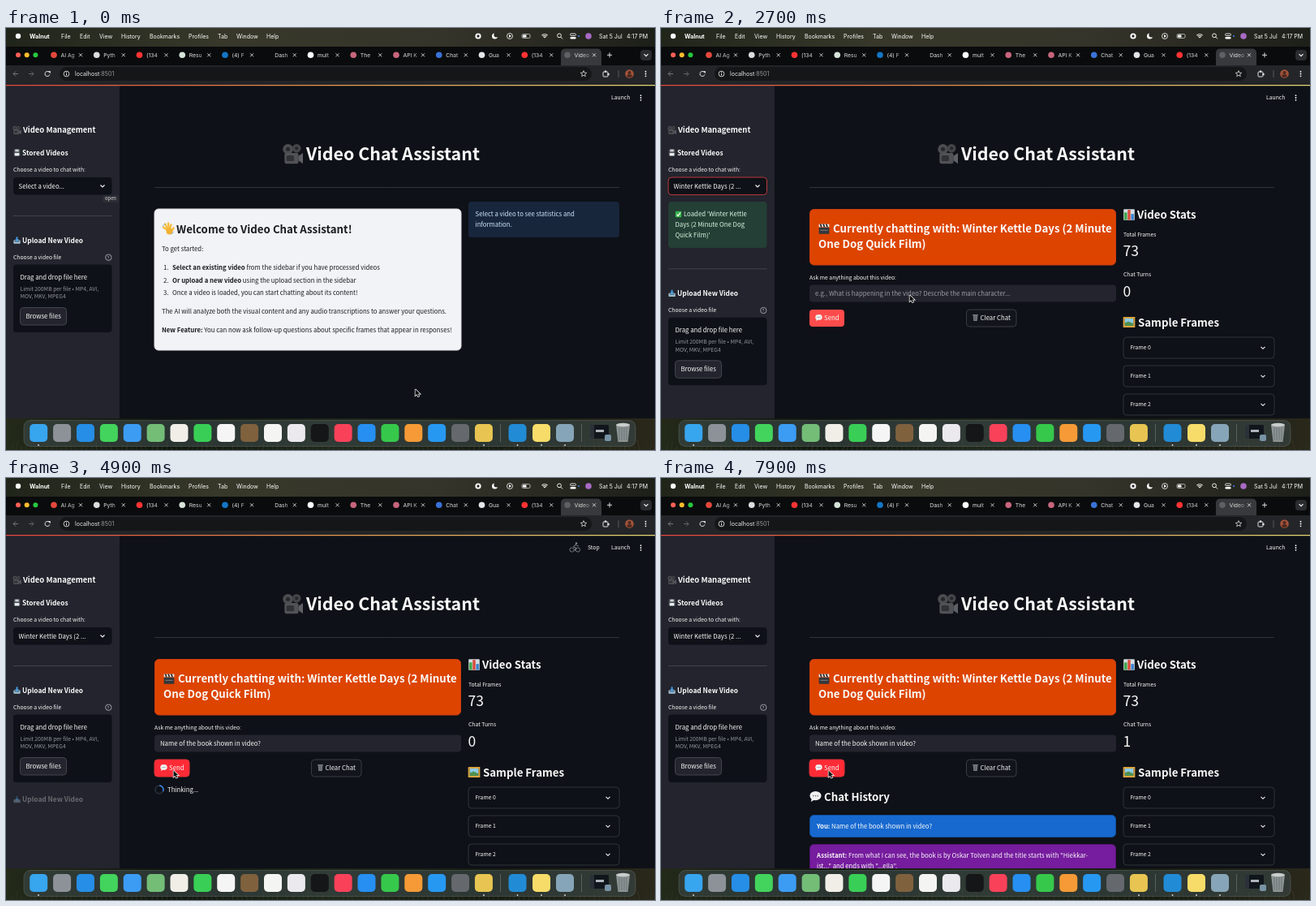
These frames come from a looping animation (800 px wide and 520 px high, 8 s). An HTML page with a canvas:

```html
<!DOCTYPE html>
<html lang="en">
<head>
<meta charset="utf-8">
<title>Video chat demo</title>
<style>
html, body { margin: 0; width: 800px; height: 520px; overflow: hidden; background: #0e1117 }
canvas { display: block }
</style>
</head>
<body>
<canvas id="stage" width="800" height="520"></canvas>
<script>
const ctx = document.getElementById('stage').getContext('2d');
const PAGE = '"Noto Sans CJK JP","Noto Sans CJK SC","Noto Sans CJK",sans-serif';
const UI = 'Inter,sans-serif';
const ZOOM = 0.4866; // page px to stage px for this typeface
const FILM = 'Winter Kettle Days (2 Minute One Dog Quick Film)';
const QUESTION = 'Name of the book shown in video?';
const BG = '#0e1117', PANEL = '#23242d', WHITE = '#fafafa', RED = '#ff4b4b', FOCUS = '#b8383c', LINE = '#31333b';

function box(x, y, w, h, r, fill, stroke) {
  ctx.beginPath();
  ctx.roundRect(x, y, w, h, r);
  if (fill) { ctx.fillStyle = fill; ctx.fill(); }
  if (stroke) { ctx.strokeStyle = stroke; ctx.lineWidth = 1; ctx.stroke(); }
}
function dot(x, y, r, fill) {
  ctx.beginPath();
  ctx.arc(x, y, r, 0, 7);
  ctx.fillStyle = fill;
  ctx.fill();
}
function arc(x, y, r, color, width = 1, from = 0, to = 2 * Math.PI) {
  ctx.beginPath();
  ctx.arc(x, y, r, from, to);
  ctx.strokeStyle = color;
  ctx.lineWidth = width;
  ctx.stroke();
}
function trace(points) {
  ctx.beginPath();
  for (let i = 0; i < points.length; i += 2) ctx.lineTo(points[i], points[i + 1]);
}
function line(points, color, width = 1) {
  trace(points);
  ctx.strokeStyle = color;
  ctx.lineWidth = width;
  ctx.stroke();
}
function poly(points, fill) {
  trace(points);
  ctx.fillStyle = fill;
  ctx.fill();
}
// y is the middle of the capitals; returns the right edge
function write(s, x, y, size, color, weight, family) {
  ctx.font = `${weight} ${size}px ${family}`;
  ctx.fillStyle = color;
  ctx.fillText(s, x, y + size * 0.365);
  return x + ctx.measureText(s).width;
}
const text = (s, x, y, px = 16, color = WHITE, weight = 400) => write(s, x, y, px * ZOOM, color, weight, PAGE);
const bold = (s, x, y, px = 16, color = WHITE) => text(s, x, y, px, color, 700);
const ui = (s, x, y, size = 7, color = '#fff', weight = 400) => write(s, x, y, size, color, weight, UI);
const chevron = (x, y, color = WHITE) => line([x - 2.5, y - 1.2, x, y + 1.3, x + 2.5, y - 1.2], color, 1.1);
function placed(x, y, scale, draw) {
  ctx.save();
  ctx.translate(x, y);
  ctx.scale(scale, scale);
  draw();
  ctx.restore();
}
function faded(alpha, draw) {
  ctx.save();
  ctx.globalAlpha = alpha;
  draw();
  ctx.restore();
}
function gradient(x0, y0, x1, y1, ...colors) {
  const g = ctx.createLinearGradient(x0, y0, x1, y1);
  colors.forEach((c, i) => g.addColorStop(i / (colors.length - 1), c));
  return g;
}

// Emoji, drawn on a grid of about 16 units around the centre
const emoji = {
  camera() {
    dot(-3.8, -4, 4, '#4b4d51'); dot(3, -4.6, 3.4, '#434549');
    dot(-3.8, -4, 1.6, '#25272a'); dot(3, -4.6, 1.3, '#25272a');
    box(-6.5, -1, 11, 8.5, 1.5, '#505256');
    box(-5, 1, 6, 4.5, 1, '#303236');
    poly([4.5, 1.5, 8, -1, 8, 7.5, 4.5, 5], '#5d6064');
  },
  hand() {
    ctx.lineCap = 'round';
    for (const [x, y] of [[-6, -2], [-4, -6], [0, -7], [3.5, -5]]) line([1, 3, x, y], '#f7bd3e', 2.4);
    line([3, 4, 6.5, -1], '#f7bd3e', 2.4);
    dot(1.5, 3, 4, '#f2b133');
    arc(0, 0, 7.5, '#5aa7dc', 0.8, 3.6, 4.1);
    arc(0, 0, 7.5, '#5aa7dc', 0.8, 0.5, 1);
  },
  floppy() {
    box(-7, -7, 14, 14, 1, '#4b5258');
    box(-4, -7, 8, 5, 0, '#c9ced2');
    box(-5, 1, 10, 6, 0, '#eceff1');
  },
  tray() {
    box(-7, 0, 14, 7, 1, '#a9c3d4');
    box(-5, 1, 10, 3, 0, '#557a92');
    line([0, -7, 0, 0], '#4aa3ea', 3);
    poly([-4, -2, 4, -2, 0, 3], '#4aa3ea');
  },
  check() {
    box(-7, -7, 14, 14, 2, '#35b44a');
    line([-4, 0, -1, 4, 4.5, -4], '#fff', 2.2);
  },
  clapper() {
    box(-7, -2, 14, 9, 1, '#33363a');
    box(-7, -6.5, 14, 4, 0, '#e8e8e8');
    for (let x = -6; x < 6; x += 4) poly([x, -6.5, x + 2, -6.5, x + 3.5, -2.5, x + 1.5, -2.5], '#222');
    line([-5, 2, 5, 2], '#9aa0a4', 0.8);
  },
  bubble() {
    ctx.beginPath();
    ctx.ellipse(0, -1, 7.5, 6, 0, 0, 7);
    ctx.fillStyle = '#f1f1f1';
    ctx.fill();
    poly([-5, 2, -1, 4, -6, 7], '#f1f1f1');
    for (const x of [-3, 0, 3]) dot(x, -1, 0.9, '#777');
  },
  bin() {
    poly([-5, -5, 5, -5, 4, 7, -4, 7], '#777c82');
    line([-6, -6, 6, -6], '#a4a9ae', 1.5);
    for (const x of [-2, 0, 2]) line([x, -3, x, 5], '#50555a', 0.8);
  },
  chart() {
    box(-7.5, -7.5, 15, 15, 1, '#d3dde2');
    box(-6.5, -3, 3.8, 10, 0, '#3fa64b');
    box(-1.9, -6.5, 3.8, 13.5, 0, '#dc4a3c');
    box(2.7, -1, 3.8, 8, 0, '#3b82d0');
  },
  picture() {
    box(-6, -5, 12, 10, 0, '#8ccbe8');
    poly([-6, 5, -6, 1, -1, -1, 6, 2, 6, 5], '#4f9151');
    line([-7, -6, 7, -6, 7, 6, -7, 6, -7, -7], '#d9a440', 2.2);
  }
};
const icon = (name, x, y, size) => placed(x, y, size / 16, emoji[name]);

function menuBar() {
  box(0, 0, 800, 23, 0, gradient(0, 0, 800, 0, '#20251a', '#37382a', '#35342a', '#1d1f19'));
  dot(15, 10, 3.2, '#fff');
  ui('Walnut', 29, 10, 7.2, '#fff', 700);
  const items = { File: 68, Edit: 91, View: 115, History: 142, Bookmarks: 177, Profiles: 225, Tab: 261, Window: 284, Help: 321 };
  for (const name in items) ui(name, items[name], 10, 7);
  dot(582, 10, 3.6, '#fff'); box(580.6, 8.6, 2.8, 2.8, 0.5, '#222');
  dot(602.5, 10, 3.5, '#fff'); dot(604.4, 8.6, 3, '#2c2c23');
  arc(621, 10, 3.5, '#fff', 0.8); poly([620, 8, 623, 10, 620, 12], '#fff');
  box(636, 7.5, 10, 5, 1.5, null, '#aaa'); box(637, 8.5, 4.5, 3, 0.5, '#fff');
  for (const r of [1.5, 3.4, 5.3]) arc(664, 13, r, '#fff', 1.1, -2.3, -0.84);
  arc(682, 9.3, 2.4, '#fff', 0.9); line([683.8, 11.2, 686, 13.4], '#fff');
  box(695.5, 7, 7, 2.5, 1.2, null, '#ddd'); box(695.5, 11, 7, 2.5, 1.2, '#fff');
  dot(706, 10, 1, '#3b82f6');
  dot(718, 10, 3.8, '#a86ac4');
  ui('Sat 5 Jul', 731, 10, 7); ui('4:17 PM', 765, 10, 7);
}

function browser() {
  box(0, 23, 800, 24, [5, 5, 0, 0], '#0a0b0c');
  ['#ff5f57', '#febc2e', '#28c840'].forEach((c, i) => dot(15 + i * 10.7, 33.3, 3, c));
  box(684, 25.5, 50, 22, [5, 5, 0, 0], '#38393c');
  const tabs = [['AI Ag', '#e5473c'], ['Pyth', '#ddd'], ['(134', '#f33'], ['Resu', '#d6e4d9'], ['(4) F', '#1476c6'],
    ['Dash', ''], ['mult', '#fff'], ['The', '#c8657c'], ['API K', '#c8657c'], ['Chat', '#3a72d8'], ['Gua', '#e4e6ea'],
    ['(134', '#f33'], ['Video', '#5d6064']];
  tabs.forEach(([name, color], i) => {
    const x = 59 + i * 52.75;
    if (color) dot(x, 33.3, 3.8, color);
    ui(name, x + 8.5, 33.3, 6.8, gradient(x + 17, 0, x + 27, 0, '#e4e4e4', '#888'));
    line([x + 31, 31.3, x + 35, 35.3], '#ddd', 0.9);
    line([x + 35, 31.3, x + 31, 35.3], '#ddd', 0.9);
  });
  line([741, 33.3, 747, 33.3], '#ddd'); line([744, 30.3, 744, 36.3], '#ddd');
  box(782, 27, 14, 13, 4, '#2b2c2f'); chevron(789, 33.3);

  box(0, 46, 800, 24, 0, '#242528');
  box(66, 48, 656, 17, 8.5, '#151618');
  for (const [x, d, c] of [[12, -1, '#777'], [31, 1, '#666']]) {
    line([x - 3 * d, 56.5, x + 3 * d, 56.5], c);
    line([x, 53.5, x + 3 * d, 56.5, x, 59.5], c);
  }
  arc(51, 56.5, 3, '#ddd', 1, 0.3, 5.4); poly([51.5, 53, 54.8, 53, 54.8, 56.2], '#ddd');
  arc(74.5, 56.5, 3.4, '#ddd', 0.9); line([74.5, 56, 74.5, 58.5], '#ddd'); dot(74.5, 54.7, 0.6, '#ddd');
  write(':8501', ui('localhost', 85, 56.5, 7.1, '#eee'), 56.5, 7.1, '#999', 400, UI);
  const star = [];
  for (let i = 0; i <= 10; i++) {
    const a = i * Math.PI / 5 - Math.PI / 2, r = i % 2 ? 1.7 : 3.9;
    star.push(712 + r * Math.cos(a), 56.5 + r * Math.sin(a));
  }
  line(star, '#ddd', 0.8);
  box(736, 54, 6, 6, 1, null, '#ddd'); dot(739, 53.5, 1.3, '#ddd'); dot(742.5, 57, 1.3, '#ddd');
  line([755, 52, 755, 61], '#55585c');
  dot(768.5, 56.5, 5.3, '#a4533a'); dot(768.5, 55, 2, '#4b2920'); box(765.3, 57.3, 6.4, 3.4, 2, '#4b2920');
  dots(788.5, 56.5);
}
function dots(x, y) {
  for (const d of [-2.8, 0, 2.8]) dot(x, y + d, 0.9, '#fff');
}

function dock() {
  box(0, 481, 800, 39, 0, gradient(0, 0, 800, 0, '#242a1a', '#11170f', '#20271b', '#161b12', '#2a281b'));
  for (let i = 0; i < 130; i++) { // grass
    const x = i * 6.2, h = 3 + (i * 37 % 11);
    line([x, 520, x + (i * 13 % 7) - 3, 520 - h], i % 3 ? '#2c3722' : '#3b3a27', 0.7);
  }
  box(22, 483.5, 754, 32, 8, 'rgba(58,72,72,.62)', 'rgba(150,165,160,.25)');
  const colors = ['#38a5ef', '#8d9299', '#268ee6', '#42d45c', '#3c9cf4', '#73bd77', '#f1eee8', '#39cf56', '#f5f5f5',
    '#80613e', '#f4f4f2', '#ebe9ee', '#151617', '#f9425a', '#268ff1', '#36c84b', '#f59a36', '#2798f2', '#65686c', '#e8c552'];
  colors.forEach((c, i) => box(29.2 + i * 28.88, 488, 22, 22, 5, c));
  [['#218bd5', 619.5], ['#f8dc69', 649], ['#87a5b8', 678]].forEach(([c, x]) => box(x, 488, 22, 22, 5, c));
  for (const x of [609.5, 709.5]) line([x, 488, x, 510], '#697371', 0.7);
  for (const x of [40, 589, 630.5, 660, 689]) dot(x, 514, 0.9, '#ddd');
  box(720, 489, 23, 17, 1, '#11161c'); box(720, 489, 5, 17, 0, '#2c3038'); box(727, 495, 10, 3, 0, '#aeb4bb');
  box(738, 501, 8, 8, 2, '#7893a5');
  poly([752, 489, 769, 489, 766.5, 510, 754.5, 510], '#8d9495');
  for (let x = 756; x < 767; x += 3) line([x, 492, x, 508], '#626a6b', 0.8);
  ctx.beginPath(); ctx.ellipse(760.5, 489, 8.5, 2.2, 0, 0, 7); ctx.fillStyle = '#c9cdcb'; ctx.fill();
}

function sidebar(s) {
  box(0, 71, 140, 410, 0, PANEL);
  if (s.hoverSide) for (const x of [121, 125]) line([x, 83, x - 2.8, 86, x, 89], '#a9abb2', 0.9);
  icon('camera', 13.5, 126, 10.5); bold('Video Management', 21, 126, 19.5);
  icon('floppy', 13.5, 153.5, 9); bold('Stored Videos', 20, 153.5, 17.2);
  text('Choose a video to chat with:', 9, 174.5, 14);
  box(9, 184, 121.5, 21.5, 4, BG, s.selectFocus ? FOCUS : null);
  text(s.chosen ? FILM.slice(0, 21) + ' ...' : 'Select a video...', 15.5, 194.7);
  if (s.caret) line([107.5, 189, 107.5, 200], WHITE, 0.8);
  chevron(119, 194.7);
  if (s.openTip) {
    box(119, 206, 20, 9, 1, '#2b2c34');
    text('open', 122, 210.3, 12, '#ddd');
  }
  if (s.loaded) {
    box(9, 214, 121.5, 57, 4, '#243f35');
    icon('check', 21.5, 229.5, 8.5);
    ["Loaded '" + FILM.slice(0, 13), FILM.slice(14, 36), FILM.slice(37) + "'"]
      .forEach((row, i) => text(row, i ? 17.5 : 28, 229.5 + i * 13, 16, '#dcf7e4'));
  }
  ctx.save();
  ctx.translate(0, s.loaded ? 65.3 : 0);
  line([9, 231.5, 130.5, 231.5], '#42444d');
  uploadTitle(261.5);
  text('Choose a video file', 9, 282.7, 14);
  arc(126.3, 282.7, 3.7, '#b8bac0', 0.8); ui('?', 124.8, 282.9, 5, '#ccc');
  box(9, 291.5, 121.5, 83.5, 4, BG);
  text('Drag and drop file here', 17.5, 307);
  text('Limit 200MB per file • MP4, AVI,', 17.5, 321.5, 14, '#94969d');
  text('MOV, MKV, MPEG4', 17.5, 331, 14, '#94969d');
  box(17.5, 344.5, 57, 21.5, 4, PANEL, '#43454e');
  text('Browse files', 24.5, 355);
  ctx.restore();
  if (s.running) faded(0.33, () => uploadTitle(396));
}
function uploadTitle(y) {
  icon('tray', 13.5, y, 9.5);
  bold('Upload New Video', 20, y, 17.2);
}

function welcome() {
  box(183, 223, 378, 174, 5, '#f2f3f6', '#dcdee2');
  const ink = '#191b20', row = (b, s, x, y) => text(s, b ? bold(b, x, y, 16, ink) : x, y, 16, ink);
  icon('hand', 200, 247.5, 16);
  bold('Welcome to Video Chat Assistant!', 210, 248, 27.3, ink);
  row('', 'To get started:', 192, 272.5);
  [['Select an existing video', ' from the sidebar if you have processed videos'],
   ['Or upload a new video', ' using the upload section in the sidebar'],
   ['', 'Once a video is loaded, you can start chatting about its content!']].forEach(([b, s], i) => {
    const y = 295 + i * 15.8;
    row('', i + 1 + '.', 194, y);
    row(b, s, 205, y);
  });
  row('', 'The AI will analyze both the visual content and any audio transcriptions to answer your questions.', 192, 349.2);
  row('New Feature:', ' You can now ask follow-up questions about specific frames that appear in responses!', 192, 372);
  box(570, 214, 186, 44, 4, '#18263c');
  text('Select a video to see statistics and', 578.5, 229.5, 16, '#cbe7fb');
  text('information.', 578.5, 242.5, 16, '#cbe7fb');
}

function chat(s) {
  box(183.5, 223.5, 377, 68.5, 5, '#dd4400', '#cf3d12');
  icon('clapper', 201, 247.5, 14.5);
  bold('Currently chatting with: ' + FILM.slice(0, 28), 212, 247.5, 27.3);
  bold(FILM.slice(29), 194, 266, 27.3);
  text('Ask me anything about this video:', 183, 307.3, 14);
  box(183, 316.5, 378, 21, 4, PANEL, s.inputFocus ? FOCUS : null);
  if (s.typed) {
    const end = text(QUESTION.slice(0, s.typed), 190, 327);
    if (s.inputFocus) {
      line([end + 0.7, 322, end + 0.7, 332], WHITE, 0.7);
      text('Press Enter to apply', 502, 331.5, 12, '#85878f');
    }
  } else text('e.g., What is happening in the video? Describe the main character...', 190, 327, 16, '#999ba3');
  box(183, 347, 43, 21, 4, s.sent ? '#ff2b36' : RED, s.sent ? '#e8323a' : null);
  icon('bubble', 194.5, 357, 9); text('Send', 201, 357.3);
  faded(s.stale, () => {
    box(376.5, 347, 61.5, 21, 4, '#12151c', '#3a3c45');
    icon('bin', 387.5, 357, 9); text('Clear Chat', 393.5, 357.3);
    stats(s);
  });
  if (s.running) {
    arc(189, 384, 5, '#2c323e', 1.4);
    const a = s.time / 1000 * 2 * Math.PI - 0.9;
    arc(189, 384, 5, '#3f8cf2', 1.4, a, a + 2);
    text('Thinking...', 199, 384);
  }
  if (s.answered) {
    icon('bubble', 190.5, 392.5, 15);
    bold('Chat History', 201, 393, 27.3);
    box(183.5, 415.5, 377, 27, 5, '#1769cf', '#124f9e');
    text(' ' + QUESTION, bold('You:', 192, 429), 429);
    box(183.5, 451.5, 377, 50, 5, '#761c9e', '#551273');
    text(' From what I can see, the book is by Oskar Tolven and the title starts with "Hiekkar-', bold('Assistant:', 192, 465), 465);
    text('ist..." and ends with "...ella".', 192, 478.5);
  }
}
function stats(s) {
  icon('chart', 577, 230, 14.5); bold('Video Stats', 587, 230, 27.3);
  text('Total Frames', 570, 254.5, 14); text('73', 569.5, 274.5, 36);
  text('Chat Turns', 570, 304, 14); text(s.answered ? '1' : '0', 569.5, 324.5, 36);
  icon('picture', 577, 362.5, 14.5); bold('Sample Frames', 588, 363, 27.3);
  for (let i = 0; i < 3; i++) {
    const y = 394 + i * 35;
    box(570, y - 13, 186, 26, 4, null, LINE);
    text('Frame ' + i, 578.5, y, 14);
    chevron(742, y);
  }
}
function runner(time) {
  const gray = '#8b8e94', bike = time % 1000 >= 500 && time < 6000;
  if (bike) { arc(697.5, 88.5, 2.6, gray, 0.8); arc(705, 88.5, 2.6, gray, 0.8); }
  else arc(701, 88, 3, gray, 0.9, -0.3, 4);
  dot(703, 80.5, 1.2, gray);
  line([702, 82, 699.5, 85, 702.5, 86, bike ? 701 : 706, 90], gray, 1);
  line([702, 82.5, 706, 84], gray, 0.8);
}

function page(s) {
  ctx.save();
  ctx.beginPath(); ctx.rect(0, 70, 800, 411); ctx.clip();
  box(0, 70, 800, 411, 0, BG);
  if (s.running) { runner(s.time); text('Stop', 717, 86, 14); }
  text('Launch', 746, 86, 14); dots(782.5, 86);
  icon('camera', 353.5, 155.5, 25);
  bold('Video Chat Assistant', 370, 155.5, 44);
  line([183, 196.5, 756, 196.5], LINE);
  if (s.loadedMain) chat(s); else welcome();
  sidebar(s);
  if (s.dropdown) {
    box(9, 250.5, 166, 19.5, 4, BG);
    text(FILM, 15.5, 260.3, 14);
  }
  ctx.restore();
}

const PATH = [[0, 504.5, 445], [200, 504.5, 445], [900, 108, 193], [1100, 108, 193], [1600, 94, 266], [1900, 94, 266],
  [2600, 306.5, 329], [3700, 306.5, 329], [4200, 206.5, 360.5], [8000, 206.5, 360.5]];
function pointerAt(time) {
  const i = PATH.findIndex(p => p[0] > time);
  const [t0, x0, y0] = PATH[i - 1], [t1, x1, y1] = PATH[i];
  const u = (time - t0) / (t1 - t0), e = u * u * (3 - 2 * u);
  return [x0 + (x1 - x0) * e, y0 + (y1 - y0) * e];
}
function pointer(x, y, beam) {
  placed(x, y, 1, () => {
    if (beam) {
      for (const [c, w] of [['#111', 2], ['#eee', 0.9]]) {
        line([-2, -4, 0, -3, 2, -4], c, w); line([0, -3, 0, 3], c, w); line([-2, 4, 0, 3, 2, 4], c, w);
      }
      return;
    }
    const shape = [0, 0, 0, 8, 1.9, 6.3, 3.2, 9.2, 4.6, 8.6, 3.4, 5.8, 5.9, 5.8, 0, 0];
    line(shape, '#fff', 1.4);
    poly(shape, '#111');
  });
}

const between = (t, a, b) => t >= a && t < b;
function draw(now) {
  const time = Math.floor(now % 8000 / 100) * 100;
  const [x, y] = pointerAt(time);
  page({
    time,
    openTip: time < 1000,
    hoverSide: x < 140,
    selectFocus: between(time, 1000, 2800),
    caret: between(time, 1000, 2000),
    dropdown: between(time, 1100, 2000),
    chosen: time >= 1700,
    loaded: between(time, 2200, 4500),
    loadedMain: time >= 2200,
    inputFocus: between(time, 2800, 4400),
    typed: Math.max(0, Math.min(QUESTION.length, Math.ceil((time - 2800) / 700 * QUESTION.length))),
    sent: time >= 4300,
    running: between(time, 4500, 7400),
    stale: time < 7400 ? 1 - 0.67 * Math.max(0, Math.min(1, (time - 5000) / 900)) : 1,
    answered: time >= 7400
  });
  menuBar();
  browser();
  box(0, 70, 800, 1.2, 0, gradient(0, 0, 800, 0, '#e8443f', '#e89a4c', '#e6d873'));
  dock();
  pointer(x, y, between(time, 1600, 2000));
}

const start = performance.now();
function tick() {
  draw(performance.now() - start);
  requestAnimationFrame(tick);
}
tick();
</script>
</body>
</html>
```
